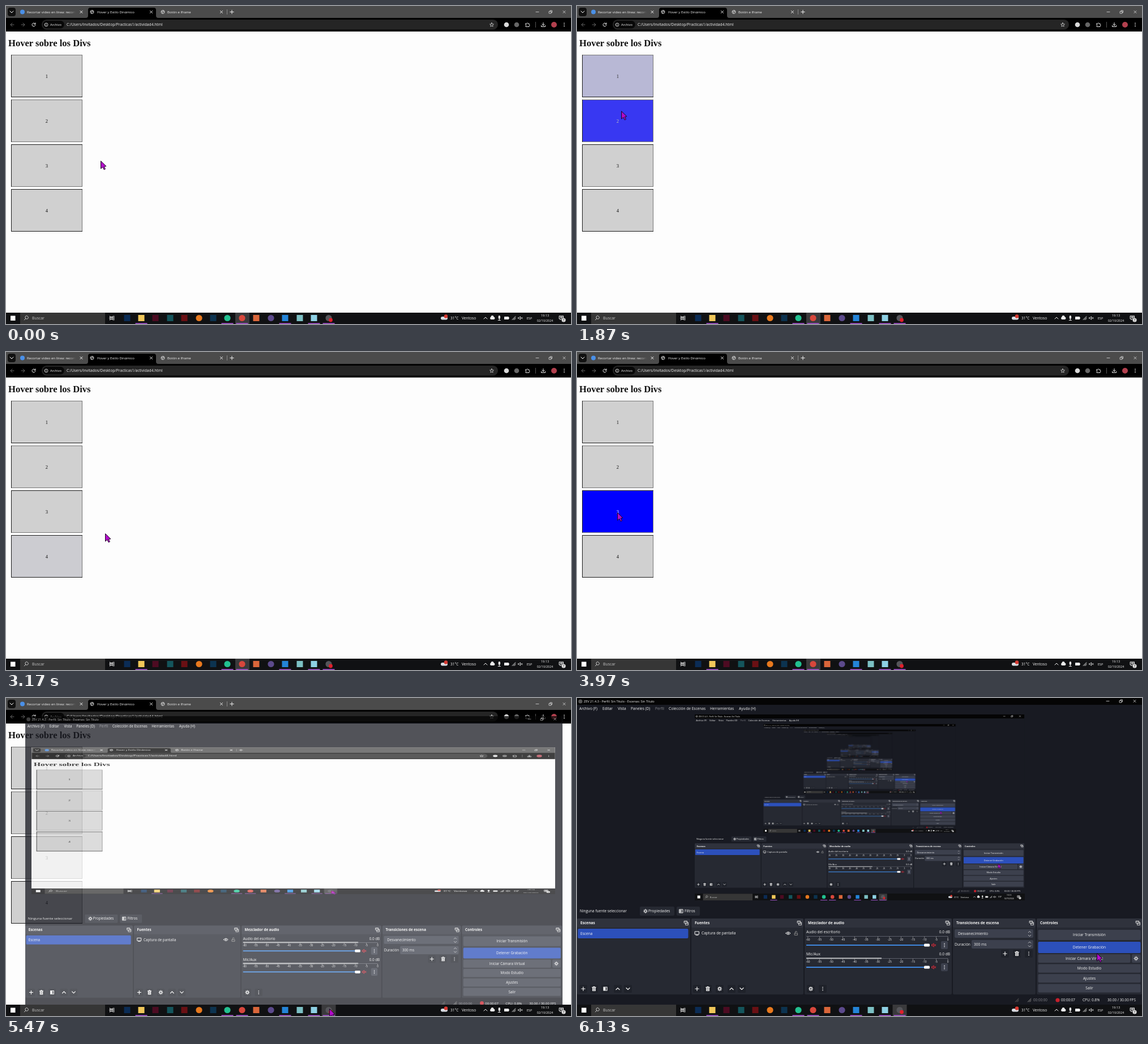
An HTML page that plays this animation: 998 by 561 pixels, repeating every 6160 ms.

```html
<!DOCTYPE html>
<html lang="es">
<head>
<meta charset="utf-8">
<title>Hover y Estilo Dinámico</title>
<style>
html, body { margin: 0; width: 100%; height: 100%; overflow: hidden; background: #000; }
svg { display: block; width: 998px; height: 561px; }
text { font-family: "Open Sans", "Noto Sans", sans-serif; fill: #f4f4f4; white-space: pre; }
.serif { font-family: "Liberation Serif", "Times New Roman", serif; fill: #111; }
.dim { fill: #85868c; }
.page text { font-weight: 500; }
.page .serif { font-weight: 700; }
.box, .win, .feed, .ptr, .early, .page, .tab-on, .app-on {
  animation: 6160ms linear infinite;
}
.box { animation-timing-function: ease; }
.box text { fill: currentColor; font-weight: 400; }
.b1 { animation-name: b1; }
.b2 { animation-name: b2; }
.b3 { animation-name: b3; }
.b4 { animation-name: b4; }
.win { animation-name: open; }
.ptr { animation-name: move; }
.feed { animation-name: fit; animation-timing-function: step-end; }
.page, .early { animation-name: gone; animation-timing-function: step-end; }
.tab-on { animation-name: blur; animation-timing-function: step-end; }
.app-on { animation-name: focus; animation-timing-function: step-end; }
.screen .screen .win { animation-name: late; animation-timing-function: step-end; }

@keyframes b1 {
  0%, 19.77%, 32.31%, 100% { fill: #d0d0d0; color: #111; }
  24.64%, 27.44% { fill: #00f; color: #fff; }
}
@keyframes b2 {
  0%, 28.25%, 42.78%, 100% { fill: #d0d0d0; color: #111; }
  33.12%, 37.91% { fill: #00f; color: #fff; }
}
@keyframes b3 {
  0%, 39.03%, 48.77%, 56%, 72.89%, 100% { fill: #d0d0d0; color: #111; }
  43.9%, 60.88%, 68.02% { fill: #00f; color: #fff; }
}
@keyframes b4 {
  0%, 44.24%, 52.44%, 68.67%, 78.73%, 100% { fill: #d0d0d0; color: #111; }
  47.56% { fill: #1515fa; color: #e6e6e6; }
  73.54%, 73.86% { fill: #00f; color: #fff; }
}
@keyframes open {
  0%, 87.66% { opacity: 0; transform: translate(95px, 90px) scale(.86); }
  88.8%, 89.25% { opacity: .75; transform: translate(34px, 32px) scale(.95); }
  90.91%, 100% { opacity: 1; transform: translate(0px, 0px) scale(1); }
}
@keyframes late { 0% { opacity: 0; } 90.91%, 100% { opacity: 1; } }
@keyframes gone { 0% { opacity: 1; } 90.92%, 100% { opacity: 0; } }
@keyframes fit {
  0% { transform: translate(12px, 58px) scale(.975, .4846); }
  90.91%, 100% { transform: translate(208px, 29px) scale(.5832, .5847); }
}
@keyframes blur { 0% { opacity: 1; } 87.66%, 100% { opacity: 0; } }
@keyframes focus { 0% { opacity: 0; } 84.42%, 100% { opacity: 1; } }
@keyframes move {
  0% { transform: translate(167px, 273px); }
  9.74% { transform: translate(172px, 215px); }
  17.05% { transform: translate(150px, 150px); }
  19.77% { transform: translate(134px, 143px); }
  20.62%, 21.1% { transform: translate(112px, 140px); }
  24.35% { transform: translate(82px, 134px); }
  28.25% { transform: translate(76px, 165px); }
  32.47% { transform: translate(80px, 205px); }
  37.91% { transform: translate(84px, 240px); }
  39.03% { transform: translate(84px, 248px); }
  40.1%, 40.58% { transform: translate(84px, 278px); }
  43.9% { transform: translate(85px, 319px); }
  45.45% { transform: translate(98px, 345px); }
  47.56% { transform: translate(135px, 340px); }
  51.46%, 51.95% { transform: translate(175px, 320px); }
  53.57% { transform: translate(170px, 310px); }
  56% { transform: translate(135px, 295px); }
  60.06% { transform: translate(80px, 284px); }
  64.45%, 64.93% { transform: translate(71px, 283px); }
  68.02% { transform: translate(74px, 319px); }
  71.43% { transform: translate(86px, 360px); }
  73.86% { transform: translate(115px, 398px); }
  79.55% { transform: translate(350px, 480px); }
  84.42% { transform: translate(565px, 548px); }
  88.8%, 90.91% { transform: translate(571px, 548px); }
  97.4% { transform: translate(880px, 460px); }
  99.51%, 100% { transform: translate(918px, 450px); }
}
</style>
</head>
<body>
<svg id="stage" viewBox="0 0 998 561"></svg>
<script>
const BG = '#181a22', PANEL = '#262932', BTN = '#3c404d', BLUE = '#2c50bb', TABS = '#4b4b4b';

const icons = {
  plus: 'M-3.2 0H3.2M0-3.2V3.2',
  close: 'M-2-2L2 2M2-2L-2 2',
  min: 'M-2.5 0H2.5',
  restore: 'M-2.5-1H1V2.5H-2.5zM-1-1V-2.5H2.5V1H1',
  up: 'M-3 1.5L0-1.5L3 1.5',
  down: 'M-3-1.5L0 1.5L3-1.5',
  back: 'M3 0H-3M0-3L-3 0L0 3',
  next: 'M-3 0H3M0-3L3 0L0 3',
  reload: 'M2.4-1.8A3 3 0 1 0 3 .6M3-3.2V-1H.8',
  trash: 'M-3.2-2.6H3.2M-2.3-2.6V3.5H2.3V-2.6M-1-3.6H1M-.8-1V2M.8-1V2',
  gear: 'M-1.9 0a1.9 1.9 0 1 0 3.8 0a1.9 1.9 0 1 0-3.8 0M0-3.6V-2M0 3.6V2M-3.6 0H-2M3.6 0H2M-2.5-2.5L-1.4-1.4M2.5-2.5L1.4-1.4M-2.5 2.5L-1.4 1.4M2.5 2.5L1.4 1.4',
  dots: 'M0-2.7V-2.6M0 0V.1M0 2.6V2.7',
  float: 'M-3.5-3.5H1.5V0H-3.5zM-1.5 0V3.5H3.5V-1.2H1.5M-3.5-3H1.5M-1.5 .7H3.5',
  filter: 'M-3-3H3V3H-3zM-2-2V2M-1-2V2M0-2V2',
  screen: 'M-3.5-3H3.5V2H-3.5zM-2 3.3H2',
  eye: 'M-4 0Q0-4.6 4 0Q0 4.6-4 0zM-1 0a1 1 0 1 0 2 0a1 1 0 1 0-2 0',
  lock: 'M-2.5 0H2.5V3.3H-2.5zM-1.5 0V-2a1.5 1.5 0 0 1 3 0',
  globe: 'M-3 0a3 3 0 1 0 6 0a3 3 0 1 0-6 0M-2.5-1.5L0 0L-1 2.5M1-2.5L.5-1L2.7 0',
  star: 'M0-3.4L1-1.1L3.4-.9L1.6 .8L2.1 3.2L0 1.9L-2.1 3.2L-1.6 .8L-3.4-.9L-1-1.1z',
  puzzle: 'M-3-2H-1a1 1 0 1 1 2 0H3V0a1 1 0 1 1 0 2V3.5H-3V1.5a1 1 0 1 0 0-2z',
  load: 'M0-3.5V1.3M-2.2-.8L0 1.4L2.2-.8M-3.5 1.5V3.4H3.5V1.5',
  find: 'M-1.2 .6a2.5 2.5 0 1 1 3.6-3.4a2.5 2.5 0 1 1-3.6 3.4L-3.6 3.4',
  views: 'M-3.5-3.5V-2H2V-3.5M-3.5-1H2V1.2H-3.5zM-3.5 3.6V2.2H2V3.6M3.8-3.5V3.6',
  wifi: 'M-3 3L3-3M-1 3L3-1M1 3L3 1',
  sound: 'M-3.5-1H-2L0-2.7V2.7L-2 1H-3.5zM1.4-1.2L3.6 1.2M3.6-1.2L1.4 1.2',
  info: 'M-3 0a3 3 0 1 0 6 0a3 3 0 1 0-6 0M0-.3V1.5M0-1.5V-1.4',
  note: 'M-3.5-3.2H3.5V2H0L-2 3.6V2H-3.5zM-2-1.5H2M-2 0H2',
};

const T = (x, y, s, size = 6.6, attr = '') =>
  `<text x="${x}" y="${y + size * .36}" font-size="${size}" ${attr}>${s}</text>`;
const mid = 'text-anchor="middle"', end = 'text-anchor="end"', bold = 'font-weight="700"', dim = 'class="dim"';
const R = (x, y, w, h, fill, r = 0) =>
  `<rect x="${x}" y="${y}" width="${w}" height="${h}" rx="${r}" fill="${fill}"/>`;
const C = (x, y, r, fill) => `<circle cx="${x}" cy="${y}" r="${r}" fill="${fill}"/>`;
const I = (name, x, y, color = '#f2f2f2', w = 1) =>
  `<path transform="translate(${x} ${y})" d="${icons[name]}" fill="none" stroke="${color}" stroke-width="${w}" stroke-linecap="round"/>`;
const G = (cls, ...parts) => `<g class="${cls}">${parts.join('')}</g>`;
const each = (list, fn) => list.map(fn).join('');
const controls = (x, y) => I('min', x, y, '#ddd', .8) + I('restore', x + 23.5, y, '#ddd', .8) + I('close', x + 47.5, y, '#ddd', .8);

const box = n => {
  const y = 7 + 79 * n, bottom = y + 74.5;
  const dark = `M9.5 ${y}v75` + (n > 2 ? `M9 ${y + .5}h126` : '') + (n % 3 == 1 ? `M9 ${bottom}h126` : '');
  return G('box b' + n,
    `<rect x="9.5" y="${y + .5}" width="125" height="74" stroke="#777"/>`,
    `<path d="${dark}" stroke="#1c1c1c" fill="none"/>`,
    `<text x="72" y="${y + 40.8}" font-size="8.6" text-anchor="middle" style="font-family:'Liberation Serif',serif">${n}</text>`);
};

const browser = () => G('page',
  R(0, 0, 998, 545, '#fdfdfd'),
  R(0, 0, 998, 22, TABS), R(0, 21, 998, 24, '#000'),
  R(3, 3, 14, 15, '#111', 4), I('down', 10, 10.5, '#fff'),
  '<path d="M141 21Q145 21 145 17V7Q145 3 149 3H261Q265 3 265 7V17Q265 21 269 21z" fill="#000"/>',
  C(29, 10.5, 4, '#4a90e8'),
  T(37, 11, 'Recortar video en línea: recorte', 6.1, 'style="fill:url(#fade)"'),
  I('close', 133, 10.5), I('globe', 152, 10.5, '#ccc'), T(161, 11, 'Hover y Estilo Dinámico', 6), I('close', 256.5, 10.5),
  I('globe', 277, 10.5, '#ccc'), T(285, 11, 'Botón e Iframe', 6), I('close', 380.5, 10.5),
  R(390, 6, 1, 9, '#888'), I('plus', 399, 10.5, '#eee'), controls(938.5, 10.5),
  I('back', 11, 33, '#666'), I('next', 30, 33, '#666'), I('reload', 49, 33),
  R(63, 24, 806, 17.5, '#252525', 8.7), R(65, 26, 38, 13.5, '#080808', 6.7),
  I('info', 71, 33, '#eee', .8), T(78, 33, 'Archivo', 5.8),
  T(107, 33, 'C:/Users/Invitados/Desktop/Practicas1/actividad4.html', 6.7),
  I('star', 858, 33, '#ddd', .8), C(884, 33, 4.3, '#d8d8d8'), C(902, 33, 4.3, '#666'),
  I('puzzle', 921, 33, '#ddd'), R(935, 28, 1, 10, '#555'), I('load', 949, 33), C(968, 33, 5, '#b2404e'),
  I('dots', 986, 33, '#fff', 1.5),
  '<text class="serif" x="4" y="71.3" font-size="16.6">Hover sobre los Divs</text>',
  each([1, 2, 3, 4], box));

const dock = ([x, w, title]) => R(x, 389, w, 134, PANEL, 2) + R(x, 389, w, 16, '#2f323c', 2) +
  T(x + 6, 397, title, 6.6, bold) + I('float', x + w - 7, 397, '#ddd', .9);

const mixer = (y, name, level) => T(405, y, name) + T(659, y, '0.0 dB', 6.6, end) +
  R(405, y + 7, 250, 1, '#5a5d68') + R(405, y + 6, level, 2.4, '#a5a7ab') +
  G('early', R(405, y + 6, 214, 2.4, '#a5a7ab')) +
  each([...Array(13).keys()], i => R(407.5 + i * 20.6, y + 8, .7, 2.5, '#aaa') +
    T(408 + i * 20.6, y + 13, i * 5 - 60, 4.8, mid)) +
  R(405, y + 22, 213, 2, '#3f86dd') + R(613, y + 20.5, 10, 5, '#fff', 1.5) +
  I('sound', 630, y + 23, '#c02a38', 1.1) + R(643, y + 16, 12, 14, BTN, 2) + I('dots', 649, y + 23, '#fff', 1.5);

const tools = (y, items) => each(items, ([name, x]) =>
  R(x - 7, y - 7, 14, 14, '#1f222a', 2) + I(name, x, y, '#f4f4f4', name == 'dots' ? 1.5 : 1.2));

const recorder = depth => G('win',
  R(0, 0, 998, 542, BG), R(0, 0, 998, 12, '#050505'),
  C(6, 6, 3.6, '#555'), T(12, 6, 'ZEV 21.4.3 - Perfil: Sin Título - Escenas: Sin Título', 5.6), controls(937.5, 5.5),
  each([[4, 'Archivo (F)'], [45, 'Editar'], [72, 'Vista'], [95, 'Paneles (D)'], [138, 'Perfil', dim],
    [162, 'Colección de Escenas'], [235, 'Herramientas'], [286, 'Ayuda (H)']], ([x, s, a]) => T(x, 18.5, s, 6.6, a)),
  depth ? G('feed', screen(depth - 1)) : '',
  T(5, 376, 'Ninguna fuente seleccionar', 6.5),
  R(89, 368, 20, 16, BG), R(111, 368, 61, 16, PANEL, 2), I('gear', 121, 376), T(126, 376, 'Propiedades'),
  R(176, 368, 41, 16, PANEL, 2), I('filter', 184, 376), T(190, 376, 'Filtros'),
  each([[0, 200, 'Escenas'], [202, 198, 'Fuentes'], [402, 260, 'Mezclador de audio'],
    [664, 146, 'Transiciones de escena'], [812, 186, 'Controles']], dock),
  R(1.5, 407, 195, 17, BLUE, 2), T(6, 416, 'Escena'),
  I('screen', 212, 415), T(220, 415, 'Captura de pantalla'), I('eye', 373, 415), I('lock', 387, 415, '#888'),
  mixer(413, 'Audio del escritorio', 0), mixer(452, 'Mic/Aux', 133),
  tools(513, [['plus', 11], ['trash', 30], ['filter', 50], ['up', 72], ['down', 90], ['plus', 212], ['trash', 231],
    ['gear', 252], ['up', 273], ['down', 291], ['gear', 413], ['dots', 434]]),
  R(667, 408, 139, 15, BTN, 2), T(673, 416, 'Desvanecimiento'),
  T(667, 434.5, 'Duración'), R(697, 427, 109, 15, BTN, 2), T(701, 434.5, '300 ms'),
  each([416, 434.5], y => `<path d="M797 ${y - 2}l2.5-2.5l2.5 2.5M797 ${y + 2}l2.5 2.5l2.5-2.5" fill="none" stroke="#ddd" stroke-width=".8"/>`),
  tools(451, [['plus', 756], ['trash', 777], ['dots', 798]]),
  each([[418, 'Iniciar Transmisión', 18], [440, 'Detener Grabación', 20], [459.5, 'Iniciar Cámara Virtual', 15],
    [477, 'Modo Estudio', 15], [494.5, 'Ajustes', 15], [512, 'Salir', 15]], ([y, s, h], i) =>
    R(814.5, y - h / 2, i == 2 ? 163 : 181, h, i == 1 ? BLUE : BTN, 2) + T(i == 2 ? 896 : 905, y, s, 6.6, mid)),
  R(980, 452, 15.5, 15, BTN, 2), I('gear', 987.5, 459.5),
  I('wifi', 777, 533, '#555'), I('wifi', 799, 533, '#777'), T(806, 533, '00:00:00', 6.3, dim),
  C(849, 533, 3.6, '#c8202c'), T(855, 533, '00:00:07', 6.3), T(893, 533, 'CPU: 0.8%', 6.4), T(937, 533, '30.00 / 30.00 FPS', 6.3));

const apps = [[214, '#0b2c56'], [239, '#f0c75a'], [264, '#4d0b22'], [290, '#14555c'], [315, '#6a1014'],
  [341, '#e8791e', 1], [366, '#0c3350'], [391, '#22c090', 1], [417, '#d8473c', 1], [442, '#d9663a'],
  [468, '#5c4a8c', 1], [493, '#2484d8'], [519, '#7cc0c4'], [544, '#8ed0e4'], [570, '#55555a', 1]];

const taskbar = () => G('bar',
  R(0, 541, 998, 20, '#101113'), R(8, 546.5, 8.5, 8.5, '#fff'),
  R(25, 541, 150, 20, '#363636'), I('find', 36, 550.5, '#ddd', .9), T(46, 551, 'Buscar', 6.9, 'style="fill:#c4c4c4"'),
  I('views', 187, 550.5, '#eee', .9),
  G('tab-on', R(405, 541, 25, 20, '#3a3a3c')), G('app-on', R(557.5, 541, 25, 20, '#3a3a3c')),
  each(apps, ([x, fill, round]) => round ? C(x, 550.5, 5.6, fill) : R(x - 5.5, 545, 11, 11, fill)),
  C(573.5, 554, 3.4, '#e0202c'),
  each([239, 391, 417, 493, 544, 570], x => R(x - 10.5, 559.3, 21, 1.7, '#a052c8')),
  R(768, 548, 12, 5.5, '#d8dce2', 2.7), C(777, 547.5, 3.2, '#d63a32'),
  T(785, 551, '31°C'), T(805, 551, 'Ventoso', 6.7),
  I('up', 847, 550.5), R(855, 548.5, 8.5, 4.6, '#eee', 2.3), C(859, 548.5, 2.5, '#eee'),
  R(869.7, 546, 3.4, 6, '#eee', 1.7), R(870.9, 552, 1, 3, '#eee'), R(868.8, 554, 5.2, .9, '#eee'),
  R(880, 548, 8, 5, '#eee', .6), R(888, 549.5, 1, 2, '#eee'),
  I('wifi', 897, 550.5, '#ccc'), I('sound', 908.5, 550.5, '#eee', .8),
  T(924.5, 551, 'ESP', 5.6, mid), T(952, 546, '19:13', 5.6, mid), T(952, 555.3, '02/10/2024', 5.4, mid),
  I('note', 981, 550), C(985, 554, 3.6, '#ddd'), T(985, 554, '7', 5, mid + ' style="fill:#111"'));

const pointer = () => G('ptr',
  '<path d="M.5 .5V14L3.8 11.2L6.2 15.8L8.4 14.7L6.2 10.3L10 9.8z" fill="#b30ccb" stroke="#1c0522" stroke-width="1" stroke-linejoin="round"/>');

function screen(depth) {
  return G('screen', browser(), recorder(depth), taskbar(), pointer());
}

document.getElementById('stage').innerHTML =
  `<defs><linearGradient id="fade" gradientUnits="userSpaceOnUse" x1="112" x2="123">
  <stop stop-color="#f2f2f2"/><stop offset="1" stop-color="${TABS}"/></linearGradient></defs>` + screen(6);
</script>
</body>
</html>
```
